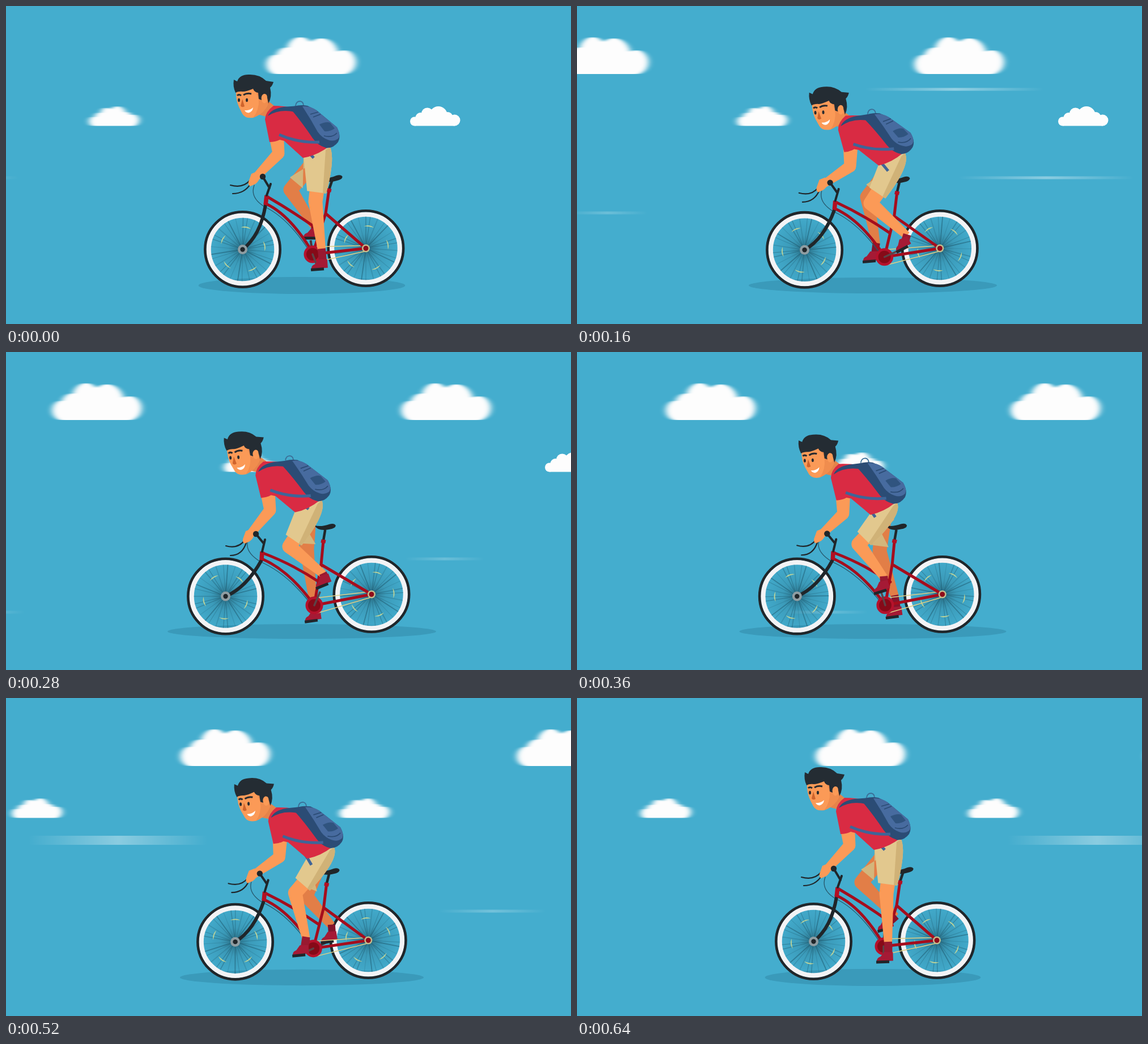
An HTML page for the animation above (0.68 s loop, 997 by 561 pixels).

```html
<!DOCTYPE html>
<html lang="en">
<head>
<meta charset="utf-8">
<title>Cyclist</title>
<style>
  html, body { margin: 0; width: 100%; height: 100%; overflow: hidden; background: #44adce; }
  svg { display: block; width: 100vw; height: 100vh; }
</style>
</head>
<body>
<svg viewBox="0 0 997 561" preserveAspectRatio="none">
  <defs>
    <filter id="smear" x="-20%" y="0" width="140%" height="100%">
      <feGaussianBlur stdDeviation="5.2 0"/>
    </filter>
    <linearGradient id="fade">
      <stop offset="0" stop-color="#fff" stop-opacity="0"/>
      <stop offset=".5" stop-color="#fff" stop-opacity=".42"/>
      <stop offset="1" stop-color="#fff" stop-opacity="0"/>
    </linearGradient>
    <radialGradient id="haze">
      <stop offset="0" stop-color="#163c4a" stop-opacity=".55"/>
      <stop offset=".45" stop-color="#1c5a70" stop-opacity=".22"/>
      <stop offset="1" stop-color="#1c6a86" stop-opacity=".06"/>
    </radialGradient>
    <g id="big" fill="#fdfdfd">
      <circle cx="-62" cy="103" r="17"/><circle cx="-43" cy="93" r="20"/>
      <circle cx="-19" cy="79" r="24"/><circle cx="18" cy="87" r="30"/>
      <circle cx="58" cy="99" r="21"/><rect x="-62" y="92" width="120" height="28"/>
    </g>
    <g id="small" fill="#fdfdfd">
      <circle cx="-36.5" cy="203.5" r="8"/><circle cx="-26" cy="197" r="9"/>
      <circle cx="-14" cy="190" r="10.5"/><circle cx="5.5" cy="193" r="16"/>
      <circle cx="22" cy="196" r="9"/><circle cx="34" cy="201.5" r="10"/>
      <rect x="-36.5" y="196" width="71" height="15.5"/>
    </g>
    <g id="rim" fill="none">
      <circle r="57" fill="url(#haze)"/>
      <circle r="60" stroke="#f2f3f5" stroke-width="8.5"/>
      <circle r="66.2" stroke="#20262a" stroke-width="4.6"/>
    </g>
    <g id="spokes"></g>
    <g id="shoe">
      <path d="M-12-1Q-12-7-5-9L2-17L17-16L17-1Z" fill="#a51a35"/>
      <path d="M-13-2H10V3H-13Z" fill="#22252a"/>
    </g>
  </defs>

  <rect width="997" height="561" fill="#44adce"/>
  <g id="clouds"></g>
  <g id="streaks" fill="url(#fade)"></g>
  <ellipse id="shadow" cx="522" cy="493" fill="#3a9aba"/>

  <g id="rearWheel"><use href="#rim"/><use id="rearSpin" href="#spokes"/></g>
  <g id="frontWheel"><use href="#rim"/><use id="frontSpin" href="#spokes"/></g>

  <path id="farCrank" stroke="#4a3338" stroke-width="4"/>
  <path id="farLeg" fill="#e27e47"/>
  <path id="farSock" stroke="#84152b" stroke-width="13"/>
  <use id="farShoe" href="#shoe"/>
  <path id="farShorts" fill="#d3b67c"/>

  <g fill="none" stroke-linecap="round">
    <path id="cable" stroke="#27576b" stroke-width="1.3"/>
    <path id="chain" stroke="#dfcf86" stroke-width="1.5"/>
    <path id="fork" stroke="#20262a" stroke-width="6"/>
    <path id="tubes" stroke="#a50d1d" stroke-width="5" stroke-linejoin="round"/>
    <path id="headTube" stroke="#b30f22" stroke-width="7.5" stroke-linecap="butt"/>
    <path id="post" stroke="#20262a" stroke-width="4.5"/>
    <path id="collar" stroke="#b30f22" stroke-width="8" stroke-linecap="butt"/>
    <path id="stem" stroke="#20262a" stroke-width="4"/>
    <path id="levers" stroke="#20262a" stroke-width="2.2"/>
  </g>
  <path id="saddle" fill="#20262a" d="M-19-4Q-8 0 8-5Q17-7 19-2Q18 3 8 4Q-12 8-19-4Z"/>
  <g id="rearHub"><circle r="7" fill="#c4bd8d"/><circle r="4.5" fill="#8f0c1a"/></g>
  <g id="frontHub"><circle r="8.5" fill="#8f9da2"/><circle r="4.2" fill="#20262a"/></g>
  <g id="ring"><circle r="15.5" fill="#b5122c"/><circle r="11" fill="#860a18"/></g>
  <path id="nearCrank" stroke="#5c4347" stroke-width="3.5" stroke-linecap="round"/>

  <path id="nearLeg" fill="#fb9a57"/>
  <path id="nearSock" stroke="#981930" stroke-width="14"/>
  <use id="nearShoe" href="#shoe"/>
  <path id="nearShorts" fill="#e2c88e"/>
  <path id="shortsShade" fill="#d0b277"/>

  <path id="arm" fill="#fb9a57"/>
  <path id="hand" fill="#fb9a57" d="M6-14L11-5Q10 3 3 8L-6 12Q-10 10-9 4L-4-10Z"/>
  <circle id="grip" r="5.2" fill="#20262a"/>

  <g id="head">
    <path d="M440 190L461 166L478 180L462 196Z" fill="#e5834a"/>
    <path d="M406 148L440 142L464 150L462 174Q455 190 436 197Q422 199 417 190L411 178Q405 165 406 148Z" fill="#fb9a57"/>
    <path d="M440 148L464 150L462 174Q455 190 436 197Q447 184 446 164Z" fill="#f08d4e"/>
    <ellipse cx="456" cy="163" rx="5.5" ry="8.5" fill="#fb9a57"/>
    <path d="M417 164L421 177Q416 180 414 176Z" fill="#cf642c"/>
    <ellipse cx="411" cy="166" rx="2" ry="3.2" fill="#272b30"/>
    <ellipse cx="425" cy="166" rx="2" ry="3.2" fill="#272b30"/>
    <path d="M408 158Q411 155 415 158M419 157Q425 153 433 155" fill="none" stroke="#272b30" stroke-width="3"/>
    <path d="M421 184Q430 185 436 179Q435 187 428 188.500Q423 188 421 184Z" fill="#fff"/>
    <path d="M405 153Q400 142 402 130L408 133Q412 121 428 121Q447 120 459 132L472 134Q470 141 466 144Q470 160 463 172L461 162Q461 154 455 155Q449 158 451 166L446 164L445 153Q438 152 436 146Q424 151 418 151Q410 150 405 153Z" fill="#242c33"/>
  </g>

  <path id="strap" fill="none" stroke="#3f6598" stroke-width="5"/>
  <g id="torso">
    <path d="M472 176Q458 186 457 200L465 240Q475 240 483 236L491 238L524 268Q548 264 568 249L540 200L510 180Q490 176 472 176Z" fill="#d92b43"/>
    <path d="M462 194Q468 181 490 178L516 176L514 188Q484 180 462 194Z" fill="#2b4c75"/>
    <path d="M511 176Q512 168 519 168Q525 169 525 176" fill="none" stroke="#3b6f98" stroke-width="1.8"/>
    <path d="M501 180Q515 173 532 176L548 184L584 214Q592 230 586 240Q577 252 564 250Q550 246 541 233Q520 202 501 180Z" fill="#2b4c75"/>
    <path d="M523 177Q538 176 548 184L584 214Q591 228 586 234Q578 240 568 236Q557 232 550 222Q538 200 523 177Z" fill="#476b9f"/>
    <path d="M553 209Q565 203 572 206L580 216Q572 222 562 221Z" fill="#30547f"/>
    <path d="M537 191L551 187M542 196L555 191M561 229Q576 233 584 224" fill="none" stroke="#2b4c75" stroke-width="1.8"/>
    <path d="M482 227Q516 242 553 240" fill="none" stroke="#3f6598" stroke-width="5"/>
  </g>
</svg>
<script>
const LOOP = 680, STEP = 40;
const TIMES = [0, 80, 160, 280, 440, 560, 640];

const squash = [0, .18, .53, 1, .8, .24, 0];
const shadowWidth = [182.5, 200.5, 219, 237, 228.5, 207, 190.5];
const frontTurn = [63, 10, -41, -122, -242, -338, -402];
const rearTurn = [62, 14, -49, -147, -259, -341, -407];

const torso = { x: [0, 8, 5, -16, 3, 6, 0], y: [0, 6, 14, 15, 22, 11, 0], a: [0, -4, -4, -2.5, -2.5, -1, 0] };
const head = { x: [0, 11, 9.5, -15, .5, 3, 0], y: [0, 13, 21, 19, 28, 14, 1], a: [0, -2, -3, -4, -2, -4, 0] };
const elbow = { x: [481, 485, 482, 466, 477, 484, 481], y: [260, 271, 283, 279, 290, 274, 260] };
const strapEnd = { x: [543, 543, 549, 534, 524, 546, 543], y: [268, 283, 291, 277, 305, 286, 268] };

const near = {
  knee: { x: [546, 538, 518, 500, 499, 519, 546], y: [345, 352, 348, 343, 337, 347, 345] },
  ankle: { x: [557, 577, 582, 560, 527, 534, 549], y: [430, 420, 405, 392, 408, 430, 432] },
  sole: { x: [551, 567, 575, 559, 517, 523, 541], y: [464, 455, 428, 412, 438, 460, 465], a: [-4, -8, -28, -22, -12, -3, -2] }
};
const far = {
  knee: { x: [502, 504, 512, 531, 533, 525, 502], y: [324, 326, 337, 348, 352, 345, 325] },
  ankle: { x: [545, 534, 528, 541, 578, 570, 562], y: [390, 397, 420, 434, 422, 392, 386] },
  sole: { x: [537, 519, 517, 540, 571, 563, 543], y: [409, 425, 450, 474, 452, 419, 408], a: [0, -5, -5, -8, -8, -10, -15] }
};

// Each bike point: relaxed x, y, then squashed x, y
const bike = {
  front: [417.5, 429.5, 387.5, 431], rear: [635, 427.5, 645, 427.5], crank: [541, 438, 544, 447],
  headTop: [460, 334, 452, 352], headLow: [458, 351, 451, 367], stem: [467, 314, 457, 331],
  grip: [453, 301, 441, 321], hand: [437, 306, 427, 326], barEnd: [430, 308, 422, 331],
  tipA: [396, 316, 388, 342], tipB: [400, 331, 396, 359], forkBend: [449, 405, 424, 416],
  topBend: [505, 362, 505, 374], topEnd: [549, 393, 553, 406],
  lowBend: [500, 368, 498, 385], lowEnd: [538, 430, 539, 440],
  collar: [570, 324, 560, 333], post: [575, 309, 563, 315],
  join: [564, 366, 556, 375], saddle: [575, 305, 563, 309]
};

// Clouds: shape, centre at t = 0, speed in px/ms, blurred or not
const clouds = [
  ['big', 538.5, .85, 1], ['big', -104, .944, 1],
  ['small', 191, .85, 1], ['small', 757.5, .85, 0], ['small', -387, .85, 1]
];
// Streaks: time when the centre is at x = 0, y, half length, thickness, strength
const streaks = [
  [49, 147, 158, 5, 1], [22, 303, 155, 5, .9], [151, 365, 70, 5, .5],
  [287, 459, 75, 5, .5], [377, 376, 95, 5, .6], [487, 251, 158, 16, .9]
];

const $ = id => document.getElementById(id);
const rad = deg => deg * Math.PI / 180;

function make(tag, parent, attrs) {
  const el = document.createElementNS('http://www.w3.org/2000/svg', tag);
  for (const k in attrs) el.setAttribute(k, attrs[k]);
  return parent.appendChild(el);
}
const draw = (id, ...parts) => $(id).setAttribute('d', parts.join(' '));
const place = (el, [x, y], a = 0, cx = 0, cy = 0) =>
  el.setAttribute('transform', `translate(${x} ${y}) rotate(${a} ${cx} ${cy})`);
const add = (p, x, y) => [p[0] + x, p[1] + y];
const along = (a, b, d) => {
  const k = d / Math.hypot(b[0] - a[0], b[1] - a[1]);
  return [a[0] + (b[0] - a[0]) * k, a[1] + (b[1] - a[1]) * k];
};
function turn([x, y], a, cx = 0, cy = 0) {
  const c = Math.cos(rad(a)), s = Math.sin(rad(a));
  return [cx + (x - cx) * c - (y - cy) * s, cy + (x - cx) * s + (y - cy) * c];
}

// Smooth cyclic curve through the key values; gain is added once per loop
function value(keys, t, gain = 0) {
  const n = TIMES.length;
  const lap = k => Math.floor(k / n);
  const at = k => TIMES[k - lap(k) * n] + lap(k) * LOOP;
  const val = k => keys[k - lap(k) * n] + lap(k) * gain;
  const slope = k => (val(k + 1) - val(k - 1)) / (at(k + 1) - at(k - 1));
  let i = n - 1;
  while (TIMES[i] > t) i--;
  const h = at(i + 1) - at(i), u = (t - at(i)) / h, v = 1 - u;
  return val(i) * (1 + 2 * u) * v * v + slope(i) * h * u * v * v
    + val(i + 1) * u * u * (3 - 2 * u) - slope(i + 1) * h * u * u * v;
}
const point = (k, t) => [value(k.x, t), value(k.y, t)];

// The two edge points beside p, square to the line a-b
function sides(a, b, p, w) {
  const len = Math.hypot(b[0] - a[0], b[1] - a[1]);
  const nx = (a[1] - b[1]) / len * w / 2, ny = (b[0] - a[0]) / len * w / 2;
  return [add(p, nx, ny), add(p, -nx, -ny)];
}
function taper(a, b, wa, wb) {
  const [a1, a2] = sides(a, b, a, wa), [b1, b2] = sides(a, b, b, wb);
  return `M${a1}L${b1}L${b2}L${a2}Z`;
}
function limb(a, b, c, wa, wb, wc) {
  const r = wb / 2;
  return taper(a, b, wa, wb) + taper(b, c, wb, wc)
    + `M${add(b, -r, 0)}a${r} ${r} 0 0 0 ${wb} 0a${r} ${r} 0 0 0 ${-wb} 0Z`;
}

function drawLeg(name, keys, hip, crank, t) {
  const knee = point(keys.knee, t), ankle = point(keys.ankle, t);
  const sole = point(keys.sole, t), a = value(keys.sole.a, t);
  const heel = add(turn([9, -9], a), ...sole);
  draw(name + 'Leg', limb(hip, knee, ankle, 28, 25, 14));
  draw(name + 'Sock', 'M', along(heel, ankle, Math.hypot(ankle[0] - heel[0], ankle[1] - heel[1]) + 2), 'L', heel);
  place($(name + 'Shoe'), sole, a);
  draw(name + 'Crank', 'M', crank, 'L', along(crank, sole, 25));
  return knee;
}

function drawBike(t, s) {
  const p = {};
  for (const k in bike) {
    const [x, y, u, v] = bike[k];
    p[k] = [x + (u - x) * s, y + (v - y) * s];
  }
  place($('frontWheel'), p.front);
  place($('rearWheel'), p.rear);
  place($('frontSpin'), [0, 0], value(frontTurn, t, -504));
  place($('rearSpin'), [0, 0], value(rearTurn, t, -504));
  place($('frontHub'), p.front);
  place($('rearHub'), p.rear);
  place($('ring'), p.crank);
  place($('saddle'), p.saddle, -5 + 3 * s);
  place($('hand'), p.hand);
  place($('grip'), p.grip);
  draw('fork', 'M', p.headLow, 'Q', p.forkBend, p.front);
  draw('headTube', 'M', p.headTop, 'L', p.headLow);
  draw('tubes', 'M', add(p.headTop, 2, 3), 'Q', p.topBend, p.topEnd,
    'M', add(p.headLow, 1, -2), 'Q', p.lowBend, p.lowEnd,
    'M', p.collar, 'L', p.join, p.crank, 'M', p.join, 'L', p.rear, p.crank);
  draw('post', 'M', p.post, 'L', p.collar);
  draw('collar', 'M', add(p.collar, .6, -2), 'L', add(p.collar, -.6, 4));
  draw('stem', 'M', p.stem, 'L', p.headTop, 'M', p.grip, 'L', add(p.stem, -2, 7));
  draw('levers', 'M', p.tipA, 'Q', add(p.tipA, 22, 6), p.barEnd, 'M', p.tipB, 'Q', add(p.tipB, 21, 0), add(p.barEnd, 2, 5));
  draw('cable', 'M', add(p.grip, -15, 15), 'Q', add(p.headLow, -28, -13), add(p.headLow, -2, 3),
    'Q', add(p.lowBend, -3, 5), add(p.lowEnd, -3, 2));
  draw('chain', 'M', add(p.crank, 2, -13), 'L', add(p.rear, 0, -5), 'M', add(p.crank, 4, 14), 'L', add(p.rear, 0, 5));
  return p;
}

function drawRider(t, p) {
  const move = point(torso, t), lean = value(torso.a, t);
  const body = (x, y) => add(turn([x, y], lean, 520, 220), ...move);
  place($('torso'), move, lean, 520, 220);
  place($('head'), point(head, t), value(head.a, t), 435, 165);

  const hip = body(556, 268), farHip = add(hip, -8, 2);
  const knee = drawLeg('near', near, hip, p.crank, t);
  const farKnee = drawLeg('far', far, farHip, p.crank, t);
  const belly = body(525, 264), back = body(572, 249);

  const [f1, f2] = sides(farHip, farKnee, along(farHip, farKnee, 55), 30);
  draw('farShorts', 'M', belly, 'L', f2, f1, hip, 'Z');
  // the edge with the smaller x is the front of the thigh
  const [h1, h2] = sides(hip, knee, along(hip, knee, 61), 34).sort((a, b) => a[0] - b[0]);
  const seat = add(hip, 25, 2);
  draw('nearShorts', 'M', belly, 'L', h1, h2, 'Q', seat, back, 'Z');
  const inner = along(h2, h1, 6);
  draw('shortsShade', 'M', inner, 'L', h2, 'Q', seat, back, 'L', add(hip, 8, -14), 'Z');

  draw('arm', limb(body(477, 228), point(elbow, t), p.hand, 26, 21, 13));
  const start = body(497, 232), end = point(strapEnd, t);
  draw('strap', 'M', start, 'Q', (start[0] + end[0]) / 2 + 3, (start[1] + end[1]) / 2 - 4, end);
}

for (let i = 0; i < 30; i++) {
  const [x, y] = turn([56, 0], i * 12 + (i % 3) * 2);
  make('path', $('spokes'), {
    d: `M0 0L${x} ${y}`, stroke: '#17495c', 'stroke-width': 1 + i % 2 * .8, opacity: [.42, .2, .3][i % 3]
  });
}
for (let i = 0; i < 5; i++) {
  make('path', $('spokes'), {
    d: 'M38-9Q43.500 0 38 9Q39.500 0 38-9Z', fill: '#dfe190', opacity: .8, transform: `rotate(${i * 72})`
  });
}
const cloudEls = clouds.map(([shape, , , blur]) => {
  const g = make('g', $('clouds'), {});
  make('use', g, blur ? { href: '#' + shape, filter: 'url(#smear)' } : { href: '#' + shape });
  return g;
});
const streakEls = streaks.map(([, y, half, h, o]) =>
  make('rect', $('streaks'), { x: -half, y: y - h / 2, width: 2 * half, height: h, opacity: o }));

function render(t) {
  clouds.forEach(([, x, speed], i) => place(cloudEls[i], [x + speed * t, 0]));
  streaks.forEach(([start], i) => place(streakEls[i], [6 * (t - start), 0]));
  const s = value(squash, t);
  $('shadow').setAttribute('rx', value(shadowWidth, t));
  $('shadow').setAttribute('ry', 15 - 2 * s);
  drawRider(t, drawBike(t, s));
}

const begin = performance.now();
function tick() {
  const t = (performance.now() - begin) % LOOP;
  render(Math.floor(t / STEP) * STEP);
  requestAnimationFrame(tick);
}
tick();
</script>
</body>
</html>
```
